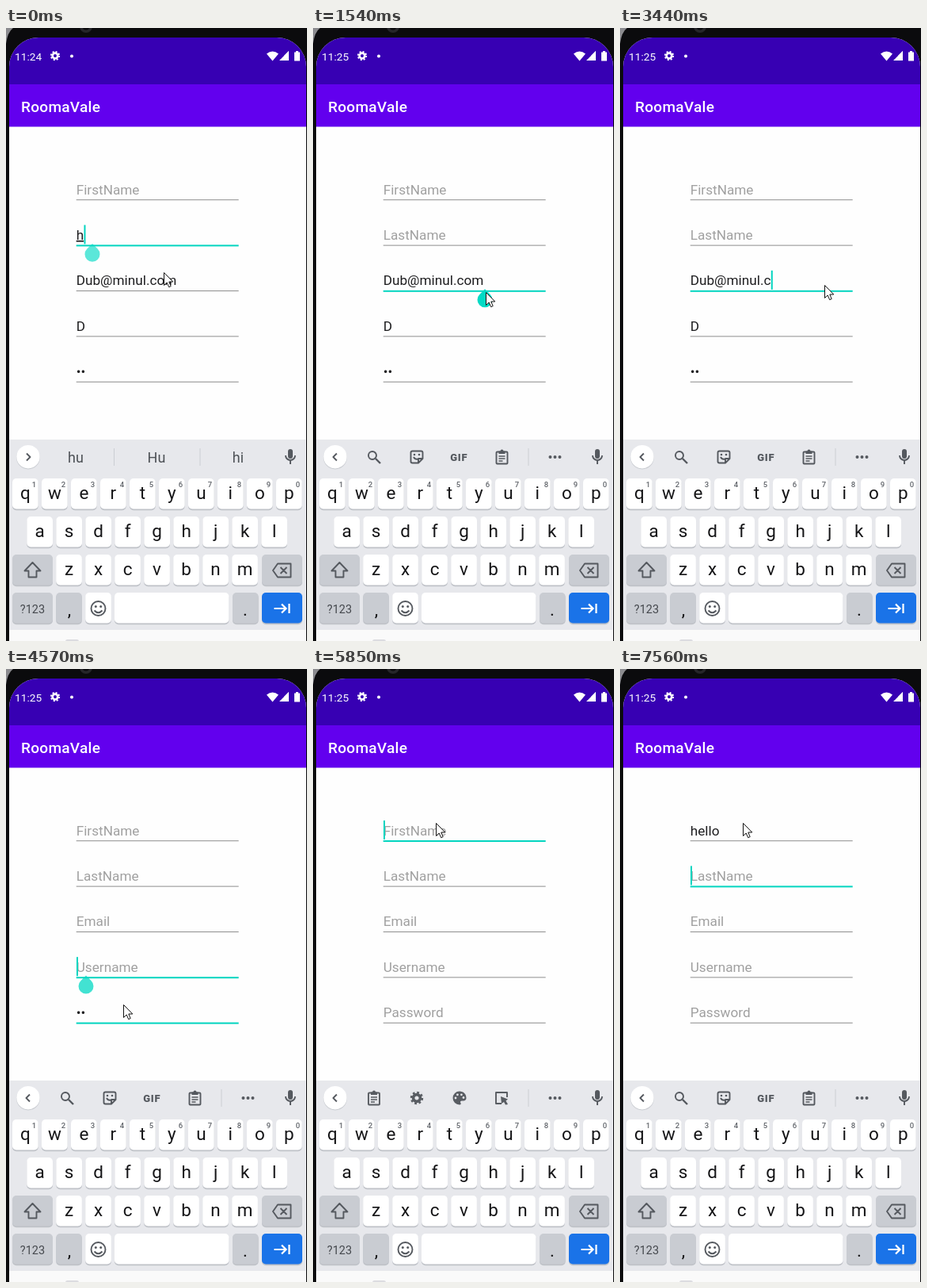
An HTML page that plays this animation: 380x773 px, repeating every 8 s.

```html
<!DOCTYPE html>
<html lang="en">
<head>
<meta charset="utf-8">
<title>Form entry</title>
<style>
html, body { margin: 0; width: 100%; height: 100%; overflow: hidden; background: #0b0b0d; }
svg { display: block; width: 100vw; height: 100vh; font-family: Roboto, Arial, sans-serif; }
.mid { text-anchor: middle; }
.field { font-size: 17.2px; white-space: pre; }
.key { font-size: 22.5px; fill: #151517; }
.sup { font-size: 9.5px; font-weight: 500; fill: #60646a; }
.sug { font-size: 18px; fill: #4d5156; }
.line { fill: none; stroke: #55595f; stroke-width: 1.9; stroke-linejoin: round; }
.solid { fill: #55595f; stroke: none; }
</style>
</head>
<body>
<svg id="stage" viewBox="0 0 380 773">
  <defs>
    <clipPath id="screen"><path d="M4 773V49A37 37 0 0 1 41 12H342A37 37 0 0 1 379 49V773Z"/></clipPath>
    <clipPath id="lens"><rect x="-47" y="-22" width="94" height="44" rx="4"/></clipPath>
    <g id="gear">
      <circle r="4.4" fill="none" stroke="currentColor" stroke-width="3.6"/>
      <circle r="6.9" fill="none" stroke="currentColor" stroke-width="2.6" stroke-dasharray="2.71"/>
    </g>
    <g id="search" class="line"><circle cx="-2" cy="-2" r="5"/><path d="M2 2L8 8" stroke-width="2.4"/></g>
    <g id="sticker" class="line">
      <path d="M-5.5-7.5H5.5Q7.5-7.5 7.5-5.5V2L2 7.5H-5.5Q-7.5 7.5-7.5 5.5V-5.5Q-7.5-7.5-5.5-7.5ZM7 2H2V7M-4 0Q-2 3.5 1.5 2.5"/>
      <g class="solid"><circle cx="-3" cy="-3" r="1.3"/><circle cx="3" cy="-3" r="1.3"/></g>
    </g>
    <g id="clip" class="line">
      <rect x="-7" y="-6.5" width="14" height="15" rx="1"/>
      <path d="M-4-1H4M-4 2H4M-4 5H1" stroke-width="1.5"/>
      <path class="solid" d="M-4-4V-7.5H-2A2 2 0 0 1 2-7.5H4V-4Z"/>
    </g>
    <g id="palette">
      <path class="solid" d="M0-8.5A8.5 8.5 0 0 0 0 8.5C2 8.5 2 7 1.3 6C.4 4.5 1.5 3.5 3 3.5H5C7 3.5 8.5 2 8.5 0C8.5-5 5-8.5 0-8.5Z"/>
      <g fill="#e7e8ec"><circle cx="-5" cy="0" r="1.4"/><circle cx="-2.6" cy="-4.2" r="1.4"/><circle cx="2.4" cy="-4.2" r="1.4"/><circle cx="5" cy="-.5" r="1.4"/></g>
    </g>
    <g id="resize" class="line"><path d="M7-1V-7H-7V7H0"/><path class="solid" d="M-1-2L8 1.5L5.5 3.5L8 8L5 8.5L3 5L0 7Z"/></g>
    <g id="more" class="solid"><circle cx="-6" r="2"/><circle r="2"/><circle cx="6" r="2"/></g>
    <g id="mic" class="line"><rect class="solid" x="-3" y="-10" width="6" height="12" rx="3"/><path d="M-6-2A6 6 0 0 0 6-2M0 4.500V9"/></g>
  </defs>

  <rect width="380" height="773" fill="#0b0b0d"/>
  <path d="M0 0H9Q2 5 0 20Z" fill="#8b8b8f"/>
  <circle cx="101" cy="-2" r="8" fill="#26262a"/><circle cx="101" cy="-2" r="4.500" fill="#0b0b0d"/>

  <g clip-path="url(#screen)">
    <rect width="380" height="773" fill="#fefefe"/>
    <rect width="380" height="71" fill="#3700b3"/>
    <rect y="71" width="380" height="53.5" fill="#6200ee"/>
    <g fill="#fff">
      <text id="clock" x="11" y="40.500" font-size="13.7"></text>
      <use href="#gear" transform="translate(62 35) scale(.75)" color="#fff"/>
      <circle cx="83" cy="35.500" r="2"/>
      <path d="M329 32.500Q336.500 26.500 344 32.500L336.500 41.500ZM345 41V41L357 29V41Z"/>
      <path d="M364 30.500H366V29H369V30.500H371V41.500H364Z"/>
      <text x="19" y="105.500" font-size="19.1" font-weight="500" letter-spacing=".24">RoomaVale</text>
    </g>
    <path d="M351 41V35L357 29V41Z" fill="#fff"/>
    <g id="form"></g>
    <rect id="caret" width="2" height="24" fill="#03d5c0"/>
    <path id="handle" d="M0-13.4L6.700-6.700A9.500 9.500 0 1 1-6.700-6.700Z" fill="#03dac5"/>
    <g id="magnifier">
      <rect x="-48" y="-21" width="96" height="45" rx="5" fill="#000" opacity=".14"/>
      <rect x="-47" y="-22" width="94" height="44" rx="4" fill="#fff"/>
      <g clip-path="url(#lens)">
        <text id="zoom" y="7" font-size="21.5" fill="#1e1e20"></text>
        <path d="M-47 16H47" stroke="#03d5c0" stroke-width="2.5"/>
        <rect x="-1" y="-15" width="2.500" height="30" fill="#03d5c0"/>
      </g>
    </g>

    <rect y="519" width="380" height="240" fill="#e7e8ec"/>
    <rect y="759" width="380" height="14" fill="#fafafa"/>
    <rect x="75" y="771" width="17" height="5" rx="2.500" fill="#dcdce0"/>
    <circle cx="28" cy="541.500" r="15" fill="#c9ccd1"/><circle cx="28" cy="540.700" r="14.700" fill="#fff"/>
    <path id="chevron" class="line"/>
    <use href="#mic" x="359" y="541"/>
    <g id="sugs">
      <path d="M136.500 530V552M245 530V552" stroke="#cbced3"/>
      <text class="sug mid" x="88" y="548"></text>
      <text class="sug mid" x="190" y="548"></text>
      <text class="sug mid" x="293" y="548"></text>
    </g>
    <g id="common">
      <path d="M272 530V552" stroke="#cbced3"/>
      <use href="#more" x="305.500" y="541"/>
    </g>
    <g id="tools">
      <use href="#search" x="77" y="541"/>
      <use href="#sticker" x="131" y="541"/>
      <text class="solid mid" x="184.300" y="545.500" font-size="13" font-weight="900" letter-spacing=".8">GIF</text>
      <use href="#clip" x="238.500" y="541"/>
    </g>
    <g id="secure">
      <use href="#clip" x="77" y="541"/>
      <use href="#gear" x="131" y="541" color="#55595f"/>
      <use href="#palette" x="185" y="541"/>
      <use href="#resize" x="238" y="541"/>
    </g>
    <g id="keys"></g>
    <g class="line">
      <path d="M33.500 674L23.500 684.500H28.500V692.500H38.500V684.500H43.500Z"/>
      <path d="M337 684L343 675.500H359.500V692.500H343ZM346.500 680L354.500 688M354.500 680L346.500 688"/>
      <circle cx="116.500" cy="732" r="9"/><path d="M111.500 734.500Q116.500 740 121.500 734.500"/>
      <g class="solid"><circle cx="113.300" cy="729.500" r="1.500"/><circle cx="119.700" cy="729.500" r="1.500"/></g>
    </g>
    <path id="action" fill="none" stroke="#fff" stroke-width="2.200"/>
  </g>
  <path id="mouse" d="M.5.5V16.500L4.200 13L6.700 18.700L9.200 17.600L6.800 12H11.800Z" fill="#fff" stroke="#111"/>
</svg>

<script>
const $ = id => document.getElementById(id);
const LOOP = 8000, LEFT = 88.700, MAIL = "Dub@minul.com";
const HINTS = ["FirstName", "LastName", "Email", "Username", "Password"];

function add(parent, tag, attrs, text = "") {
  const el = document.createElementNS("http://www.w3.org/2000/svg", tag);
  for (const k in attrs) el.setAttribute(k, attrs[k]);
  el.textContent = text;
  return parent.appendChild(el);
}

const rowY = i => 209.500 + i * 57.400;
const fields = HINTS.map((hint, i) => ({
  text: add($("form"), "text", { x: LEFT, y: rowY(i), class: "field" }),
  rule: add($("form"), "rect", { x: LEFT, width: 205 })
}));

// Keyboard
function key(x, y, w, label, fill = "#fff") {
  add($("keys"), "rect", { x, y: y + 1.2, width: w, height: 39, rx: 5, fill: "#bfc2c8" });
  add($("keys"), "rect", { x, y, width: w, height: 38.5, rx: 5, fill });
  if (label) add($("keys"), "text", { x: x + w / 2, y: y + 26, class: "key mid" }, label);
}
const GREY = "#c9ccd2";
[["qwertyuiop", 8, 568], ["asdfghjkl", 26.3, 616], ["zxcvbnm", 63.200, 664]].forEach(([row, x, y]) =>
  [...row].forEach((c, i) => key(x + i * 37, y, 32.700, c)));
for (let i = 0; i < 10; i++)
  add($("keys"), "text", { x: 35.500 + i * 37, y: 578.500, class: "sup mid" }, (i + 1) % 10);
key(8, 664, 51, "", GREY);
key(323, 664, 51, "", GREY);
key(8, 712, 51, "", GREY);
key(63.200, 712, 32.700, "", GREY);
key(100.200, 712, 32.700);
key(137, 712, 144.500);
key(286, 712, 32.700, "", GREY);
key(323, 712, 51, "", "#1a73e8");
add($("keys"), "text", { x: 33.500, y: 737.500, class: "mid", "font-size": 14.500, fill: "#45484d" }, "?123");
add($("keys"), "text", { x: 80, y: 741, class: "key mid" }, ",");
add($("keys"), "text", { x: 302, y: 741, class: "key mid" }, ".");

// Timelines: step() holds the latest value, track() interpolates
const step = (list, t) => list.reduce((v, [at, next]) => t >= at ? next : v, list[0][1]);
function track(list, t, k = 1) {
  const i = list.findIndex(p => p[0] > t);
  if (i === 0) return list[0][k];
  if (i < 0) return list[list.length - 1][k];
  const a = list[i - 1], b = list[i];
  return a[k] + (b[k] - a[k]) * (t - a[0]) / (b[0] - a[0]);
}

const FIRST = [[0, ""], [6630, "h"], [6930, "he"], [7050, "hel"], [7110, "hell"], [7200, "hello"]];
const FOCUS = [[0, 1], [940, 2], [4020, 3], [4570, 4], [5600, 0], [7470, 1]];
const CARET = [[0, 1], [630, 0], [940, 1], [1440, 0], [1870, 1], [2230, 0], [2680, 1], [5190, 0], [5600, 1], [6190, 0], [6630, 1]];
const MOUSE = [[0, 199, 308], [560, 199, 308], [690, 218, 306], [1150, 218, 306], [1300, 218, 333],
  [1810, 218, 333], [1990, 93, 341], [2170, 93, 341], [2290, 303, 550], [2430, 303, 550],
  [2730, 258, 324], [3900, 258, 324], [4200, 120, 373], [4260, 120, 373], [4380, 148, 423],
  [5400, 148, 423], [5600, 155, 194]];
const HANDLE = [[0, .65], [60, .65], [180, 0], [1000, 0], [1120, 1], [3070, 1], [3190, 0],
  [4260, 0], [4380, 1], [4510, 1], [4570, .75], [4690, 0]];
const DRAG = [[1810, 217], [1990, 90]];
const SUGGEST = [[0, 1], [430, 1], [620, 0], [6630, 0], [6750, 1], [7470, 1], [7560, 0]];
const SECURE = [[4980, 0], [5100, 1], [5850, 1], [5890, 0]];
const WORDS = {
  h: ["hu", "Hu", "hi"], he: ["he", "He", "hey"], hel: ["help", "hello", "held"],
  hell: ["hell", "hello", "Hell"], hello: ["hello", "Hello", "hey"]
};

// Backspace: first press, repeat delay, then steady repeat
function mailAt(t) {
  const gone = t < 3130 ? 0 : t < 3440 ? 1 : 2 + Math.floor((t - 3440) / 36);
  return MAIL.slice(0, Math.max(0, MAIL.length - gone));
}

const put = (el, x, y) => el.setAttribute("transform", `translate(${x} ${y})`);

function render(t) {
  const first = step(FIRST, t);
  const values = [first, t < 310 ? "h" : "", mailAt(t), t < 4170 ? "D" : "",
    "•".repeat(step([[0, 2], [5100, 1], [5160, 0]], t))];
  const focus = step(FOCUS, t);
  const active = t >= 4570 && t < 4630 ? 3 : focus;

  fields.forEach(({ text, rule }, i) => {
    const on = i === focus || i === active;
    text.textContent = values[i] || HINTS[i];
    text.setAttribute("fill", values[i] ? "#1e1e20" : "#a0a0a0");
    text.setAttribute("text-decoration", values[i] && on && i < 2 ? "underline" : "none");
    rule.setAttribute("y", rowY(i) + (on ? 6.500 : 6.700));
    rule.setAttribute("height", on ? 2 : 1);
    rule.setAttribute("fill", on ? "#03d5c0" : "#8e8e8e");
  });

  const dragX = track(DRAG, t);
  const width = values[active] ? fields[active].text.getComputedTextLength() : 0;
  const caretX = t >= 1810 && t < 3130 ? dragX - 1 : LEFT + width + .3;
  put($("caret"), caretX, rowY(active) - 18.500);
  $("caret").setAttribute("opacity", step(CARET, t));

  $("handle").setAttribute("opacity", track(HANDLE, t));
  if (t < 900) put($("handle"), 109, 285.300);
  else if (t < 3200) put($("handle"), dragX, 342.700);
  else put($("handle"), 101, 400);

  $("magnifier").setAttribute("visibility", t >= 1870 && t < 1995 ? "visible" : "hidden");
  put($("magnifier"), dragX, 277);
  $("zoom").textContent = MAIL;
  $("zoom").setAttribute("x", (LEFT - dragX) * 1.25);

  const sug = track(SUGGEST, t), secure = track(SECURE, t);
  $("sugs").setAttribute("opacity", sug);
  $("common").setAttribute("opacity", 1 - sug);
  $("secure").setAttribute("opacity", secure);
  $("tools").setAttribute("opacity", 1 - sug - secure);
  const words = WORDS[first || "h"];
  $("sugs").querySelectorAll("text").forEach((el, i) => el.textContent = words[i]);
  $("chevron").setAttribute("d", sug > .5 ? "M26 536.500L30.500 541L26 545.500" : "M30 536.500L25.500 541L30 545.500");

  $("action").setAttribute("d", t >= 4980 && t < 5790
    ? "M340 732L346 738L358 726"
    : "M338.500 732H353M348 726.500L353.500 732L348 737.500M357.500 726V738");
  $("clock").textContent = t < 1500 ? "11:24" : "11:25";
  put($("mouse"), track(MOUSE, t, 1), track(MOUSE, t, 2));
}

const start = performance.now();
function frame() {
  render((performance.now() - start) % LOOP);
  requestAnimationFrame(frame);
}
frame();
</script>
</body>
</html>
```
